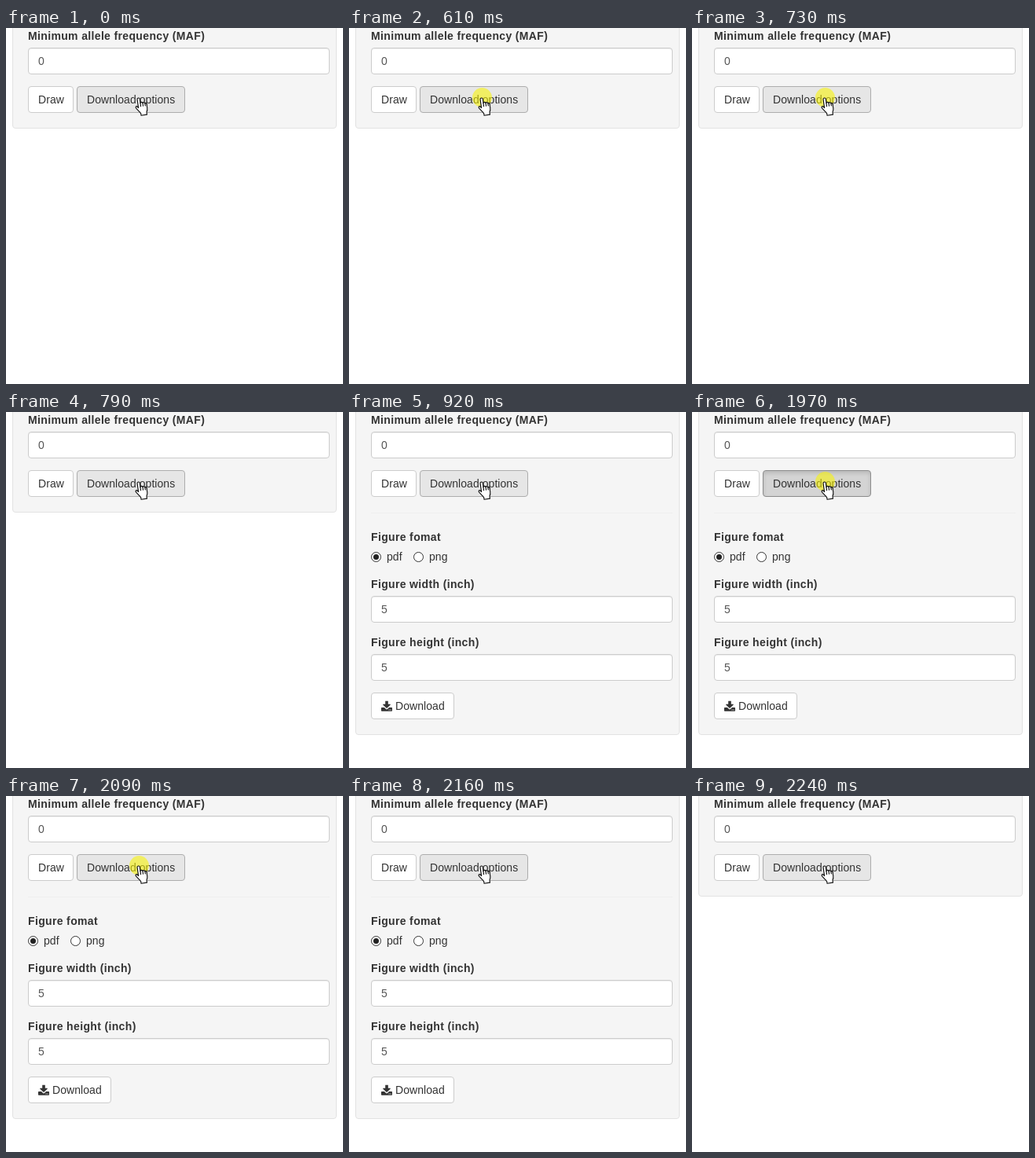
Write an HTML page that moves like this. It is 429x453 px and loops after 2720 ms.

```html
<!DOCTYPE html>
<html lang="en">
<head>
<meta charset="utf-8">
<title>Download options</title>
<style>
  html, body { margin: 0; width: 100%; height: 100%; overflow: hidden; background: #fff; }
  body { position: relative; font: 14px/20px "Liberation Sans", Arial, sans-serif; letter-spacing: .06px; color: #333; }
  body *, svg { position: absolute; box-sizing: border-box; white-space: nowrap; }
  svg * { position: static; }

  .panel {
    left: 8px; top: -20px; width: 413px; height: 148px;
    background: #f5f5f5; border: 1px solid #e3e3e3; border-radius: 4px;
    box-shadow: inset 0 1px 1px rgba(0, 0, 0, .05);
    animation: panel 2720ms step-end infinite;
  }
  .more { left: 0; top: 0; visibility: hidden; animation: more 2720ms step-end infinite; }
  b, span { left: 28px; }
  b { letter-spacing: .35px; }
  .field, .btn { left: 28px; height: 34px; padding: 6px 12px; background: #fff; border: 1px solid #ccc; border-radius: 4px; }
  .field { width: 384px; color: #555; box-shadow: inset 0 1px 1px rgba(0, 0, 0, .075); }
  .options { left: 90px; width: 138px; background: #e6e6e6; border-color: #adadad; animation: press 2720ms step-end infinite; }
  .rule { left: 28px; top: 128px; width: 384px; height: 1px; background: #eee; }
  .radio { top: 178px; width: 13px; height: 13px; border: 1px solid #333; border-radius: 50%; background: #fff; }
  .on::after { content: ""; position: absolute; inset: 2px; border-radius: 50%; background: #222; }
  .glow {
    left: 157px; top: 76px; width: 25px; height: 25px; border-radius: 50%;
    background: rgba(250, 245, 0, .57); visibility: hidden;
    animation: glow 2720ms step-end infinite;
  }
  .hand { left: 163px; top: 86px; transform: rotate(-8deg) scaleX(.96); }

  @keyframes panel { 0%, 82.353% { height: 148px } 33.824% { height: 431px } }
  @keyframes more { 0%, 82.353% { visibility: hidden } 33.824% { visibility: visible } }
  @keyframes glow {
    0%, 29.044%, 79.412% { visibility: hidden }
    22.426%, 72.426% { visibility: visible }
  }
  @keyframes press {
    0%, 26.838%, 76.838% { background: #e6e6e6; border-color: #adadad; box-shadow: none }
    24.632%, 72.426% { background: #d4d4d4; border-color: #8c8c8c; box-shadow: inset 0 3px 5px rgba(0, 0, 0, .125) }
  }
</style>
</head>
<body>
  <div class="panel"></div>
  <b style="top:0">Minimum allele frequency (MAF)</b>
  <div class="field" style="top:25px">0</div>
  <div class="btn" style="top:74px;width:58px">Draw</div>
  <div class="btn options" style="top:74px">Download options</div>

  <div class="more">
    <div class="rule"></div>
    <b style="top:149px">Figure fomat</b>
    <div class="radio on" style="left:28px"></div>
    <span style="left:48px;top:174px">pdf</span>
    <div class="radio" style="left:82px"></div>
    <span style="left:102px;top:174px">png</span>
    <b style="top:209px">Figure width (inch)</b>
    <div class="field" style="top:234px">5</div>
    <b style="top:283px">Figure height (inch)</b>
    <div class="field" style="top:308px">5</div>
    <div class="btn" style="top:357px;width:106px;padding-left:30px">Download</div>
    <svg style="left:41px;top:367px" width="14" height="14" fill="#333">
      <path d="M.7 9H4l2 2q1 .8 2 0l2-2h3.300q.7 0 .7.7v3.300q0 .7-.7.7H.7q-.7 0-.7-.7V9.700Q0 9 .7 9z"/>
      <path d="M5.2.8h3.600v4h2.600q.8.2.2.9L7.400 9.700q-.4.3-.8 0L2.400 5.700q-.6-.7.2-.9h2.600z"/>
      <path d="M9.500 12h1m1 0h1" stroke="#fff"/>
    </svg>
  </div>

  <div class="glow"></div>
  <svg class="hand" width="20" height="28" fill="#fff" stroke="#111" stroke-width="1.2" stroke-linejoin="round" stroke-linecap="round">
    <path d="M5.2 15V4.2a1.7 1.7 0 0 1 3.4 0V9.4q.3-1 1.5-1t1.6 1.3q.3-.7 1.4-.7t1.5 1.4q.4-.5 1.1-.4 1 .2 1 1.6v5q0 3-1.5 5.2V25H7.4v-2.4Q6.6 20.5 4.8 18.8L2.3 15.3Q1.2 13.500 2.3 12.8 3.7 12.3 5.2 15z"/>
    <path d="M8.6 9.4v4m3.100-3.700v3.700m2.900-3v3" fill="none"/>
  </svg>
</body>
</html>
```
